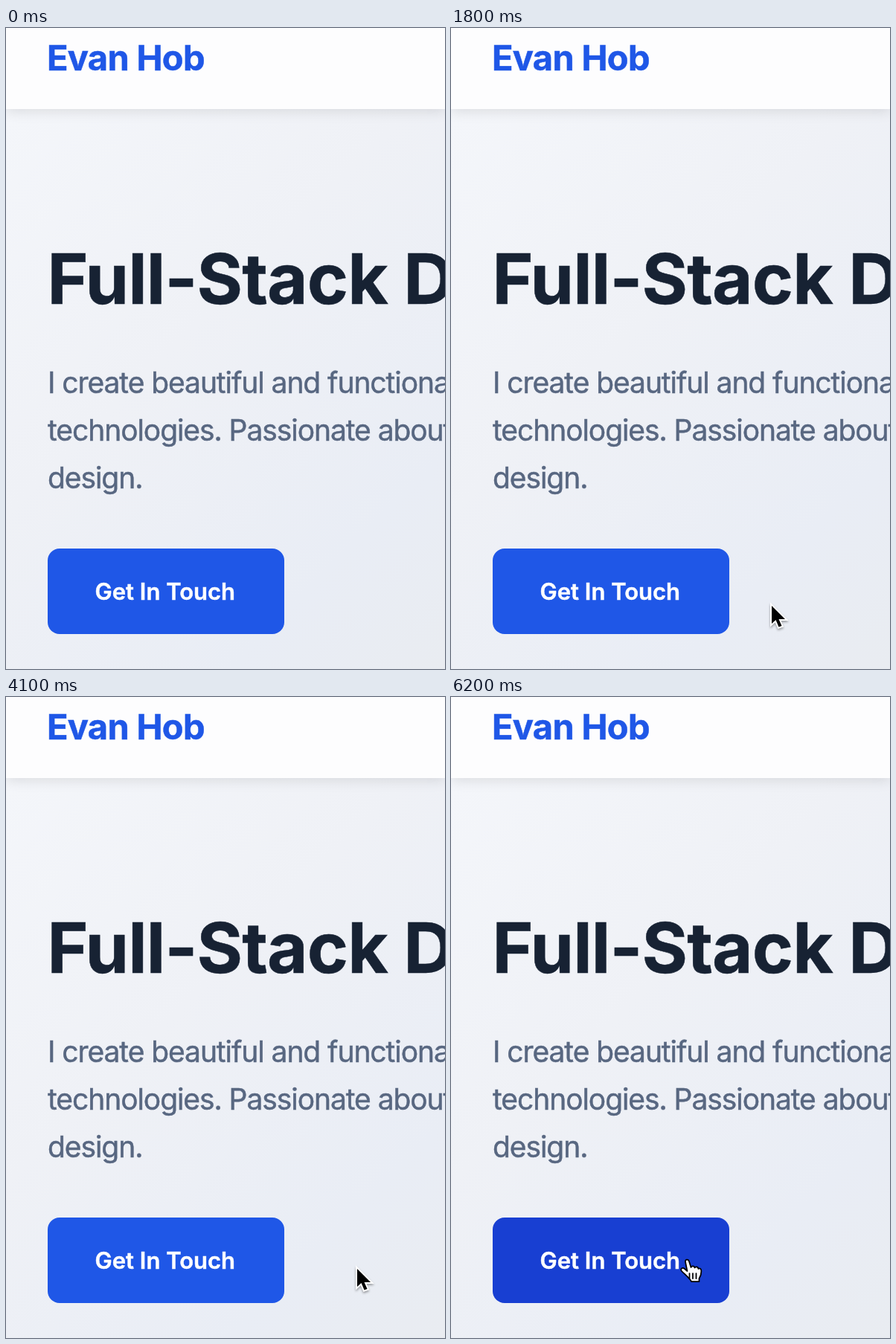
Recreate the animation shown at these times as an HTML page. Size 590 by 862 pixels, loop 6.3 s.

```html
<!DOCTYPE html>
<html lang="en">
<head>
<meta charset="utf-8">
<style>
  html, body { margin: 0; width: 100%; height: 100%; overflow: hidden; }
  .stage {
    position: relative; width: 590px; height: 862px; overflow: hidden;
    background: linear-gradient(135deg, #f5f7fb, #eff1f6 45%, #e9edf5 80%, #e9ecf1);
  }
  header { height: 109px; background: #fdfdfe; box-shadow: 0 4px 16px rgba(0, 0, 0, .1); }
  svg { position: absolute; inset: 0; font-family: Inter, sans-serif; }
  text { fill: var(--ink); stroke: var(--ink); stroke-width: .5px; }
  .logo { --ink: #1f57e7; font-size: 47px; font-weight: 700; letter-spacing: -.015em; }
  .title { --ink: #172233; font-size: 94px; font-weight: 700; letter-spacing: -.0095em; }
  .lead { --ink: #586781; font-size: 39px; letter-spacing: -.0275em; }
  .label { --ink: #fff; font-size: 31px; font-weight: 600; }
  #arrow { filter: drop-shadow(0 2px 1.5px rgba(0, 0, 0, .35)); }
</style>
</head>
<body>
<div class="stage">
  <header></header>
  <svg width="590" height="862">
    <text class="logo" x="55" y="56.5">Evan Hob</text>
    <text class="title" x="55.5" y="371">Full-Stack Developer</text>
    <g class="lead">
      <text x="56" y="491">I create beautiful and functional</text>
      <text x="56" y="555">technologies. Passionate about</text>
      <text x="56" y="619">design.</text>
    </g>
    <rect id="button" x="56" y="700" width="318" height="115" rx="16"/>
    <text class="label" x="119.5" y="769">Get In Touch</text>
    <g id="cursor">
      <path id="arrow" d="M1 3V27L6.5 22L10.5 31.5L14.5 30L10.5 21H19Z"
            stroke="#fff" stroke-width="4" paint-order="stroke"/>
      <g id="hand" stroke="#000" stroke-width="1.75" stroke-linecap="round" stroke-linejoin="round">
        <path fill="#fff" d="M0 3.5C-.5 0 4-.5 5 3L7.5 11C9 8.5 12 9 12.5 11.5C14 9.5 17 10 17.5 13C19 11.5 21.5 13 21.3 16C21.5 20 20.5 23 18.5 26V30H8C6 26 1 22-5 16C-7.5 13-4 10.5-1 13L2.5 16Z"/>
        <path fill="none" d="M5.5 19V26M10 19V26M14.5 19V26"/>
      </g>
    </g>
  </svg>
</div>
<script>
  const LOOP = 6300, STEP = 100;
  // Pointer stops: time, x, y
  const stops = [
    [600, 559, 820], [1000, 314, 770], [1500, 310, 766], [1800, 430, 774],
    [2150, 314, 770], [2500, 440, 780], [3000, 312, 755], [3500, 312, 755],
    [4100, 471, 766], [4500, 314, 757], [4800, 393, 761], [5100, 315, 756], [LOOP, 315, 756]
  ];
  const [button, cursor, arrow, hand] =
    ['button', 'cursor', 'arrow', 'hand'].map(id => document.getElementById(id));
  const show = (el, on) => el.setAttribute('visibility', on ? 'visible' : 'hidden');

  function pointerAt(t) {
    const i = stops.findIndex(s => s[0] > t);
    if (i < 1) return null;
    const [t0, x0, y0] = stops[i - 1], [t1, x1, y1] = stops[i];
    const k = (1 - Math.cos(Math.PI * (t - t0) / (t1 - t0))) / 2;
    return [x0 + (x1 - x0) * k, y0 + (y1 - y0) * k];
  }

  function draw(time) {
    // The pointer is sampled ten times a second
    const p = pointerAt(Math.floor(time % LOOP / STEP) * STEP);
    const hover = !!p && p[0] < 374 && p[1] > 700 && p[1] < 815;
    if (p) cursor.setAttribute('transform', `translate(${p})`);
    show(arrow, p && !hover);
    show(hand, hover);
    button.setAttribute('fill', hover ? '#183fd2' : '#1f57e7');
  }

  let start;
  function frame(now) {
    start ??= now;
    draw(now - start);
    requestAnimationFrame(frame);
  }
  requestAnimationFrame(frame);
</script>
</body>
</html>
```
